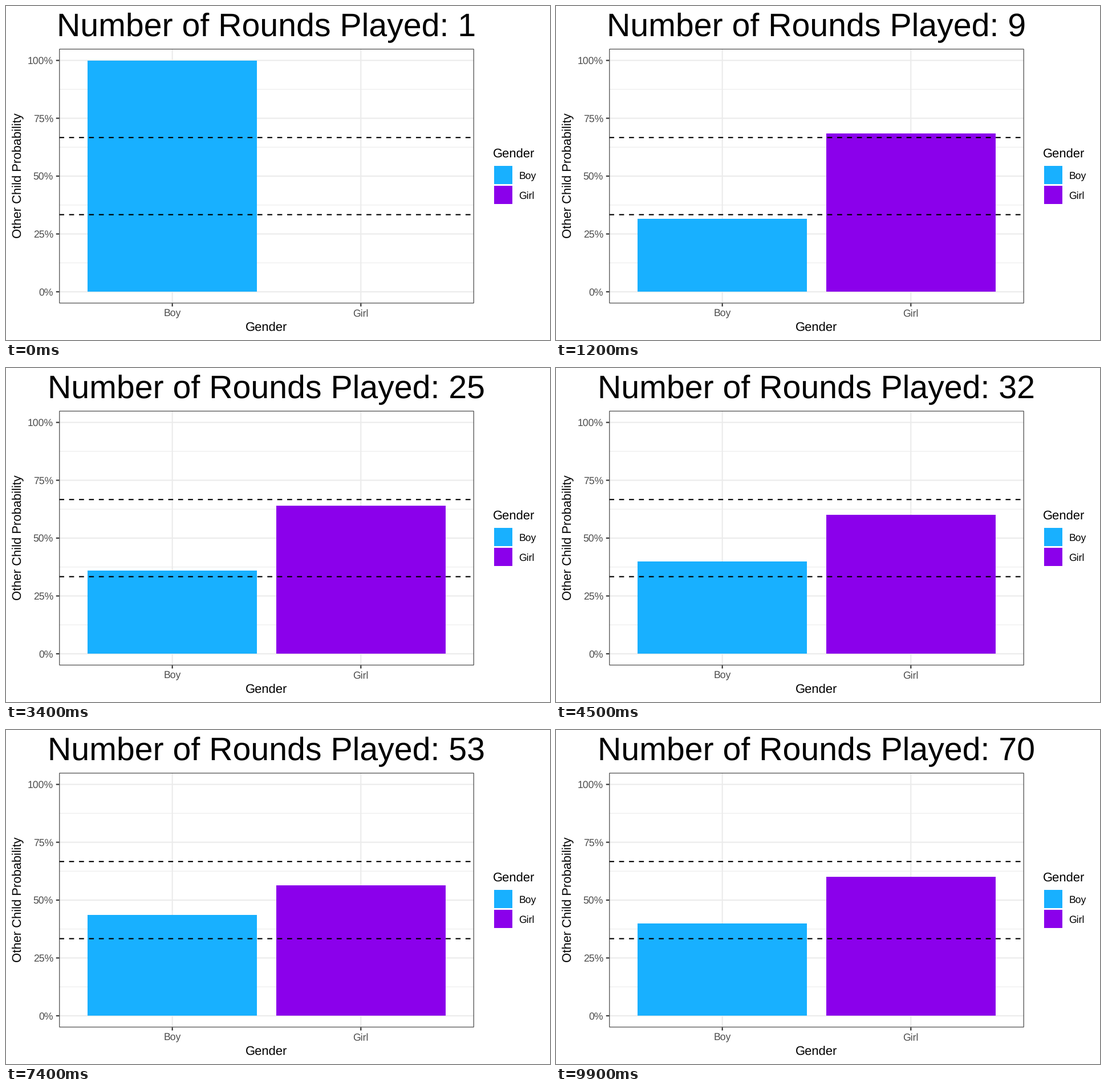
A matplotlib script that plays this animation: 954x587 px, repeating every 10000 ms.

```python
import numpy as np
import matplotlib.pyplot as plt
from matplotlib.animation import FuncAnimation
from matplotlib.patches import Rectangle

plt.rcParams["font.family"] = ["Liberation Sans", "DejaVu Sans"]
plt.rcParams["text.hinting"] = "none"

W, H, DPI = 954, 587, 64
PT = 72 / DPI  # points per pixel
FRAMES, ROUNDS = 100, 70

BLUE, PURPLE = "#18B0FF", "#8B00EB"
GRID, DARK, TICK_TEXT = "#EBEBEB", "#333333", "#4D4D4D"

# Panel edges in pixels, y pointing down
LEFT, RIGHT, TOP, BOTTOM = 93.3, 820.7, 75.3, 522.6
UNIT = (RIGHT - LEFT) / 2.2
SPAN = (BOTTOM - TOP) / 1.1
ZERO = BOTTOM - 0.05 * SPAN
CENTERS = [LEFT + 0.6 * UNIT, LEFT + 1.6 * UNIT]
MID_X, MID_Y = (LEFT + RIGHT) / 2, (TOP + BOTTOM) / 2
THICK, THIN, DASH = 2.13, 1.07, 8.69

# Running count of boys; shares are rounded to whole percents
rounds = np.arange(1, ROUNDS + 1)
boys = np.ceil(np.interp(rounds, [1, 9, 10, 16, 25, 41, 52, 53, 70],
                         [1, 3, 3, 6, 9, 18, 23, 23, 28]) - 0.5)
shares = np.round(boys / rounds, 2)
key_times = np.round((rounds - 1) * (FRAMES - 1) / (ROUNDS - 1))

fig = plt.figure(figsize=(W / DPI, H / DPI), dpi=DPI, facecolor="white")
ax = fig.add_axes([0, 0, 1, 1])
ax.set(xlim=(0, W), ylim=(H, 0))
ax.axis("off")


def y_at(p):
    return ZERO - p * SPAN


def line(x, y, color, width, z=1, **kw):
    ax.plot(x, y, color=color, lw=width * PT, zorder=z, snap=False,
            solid_capstyle="butt", dash_capstyle="butt", **kw)


def label(x, y, s, size, color="black", ha="center", **kw):
    return ax.text(x, y, s, fontsize=size * PT, color=color, ha=ha,
                   va="baseline", **kw)


def box(x, y, w, h, color):
    return ax.add_patch(Rectangle((x, y), w, h, facecolor=color, lw=0,
                                  zorder=2, snap=True))


# Grid, ticks and tick labels
for p in (0.125, 0.375, 0.625, 0.875):
    line([LEFT, RIGHT], [y_at(p)] * 2, GRID, THIN, 0.5)
for p in (0, 0.25, 0.5, 0.75, 1):
    y = y_at(p)
    line([LEFT, RIGHT], [y, y], GRID, THICK)
    line([LEFT - 5.5, LEFT], [y, y], DARK, THICK, 5)
    label(83, y + 6.3, f"{p:.0%}", 17.6, TICK_TEXT, "right")
for x, name in zip(CENTERS, ("Boy", "Girl")):
    line([x, x], [TOP, BOTTOM], GRID, THICK)
    line([x, x], [BOTTOM, BOTTOM + 5.5], DARK, THICK, 5)
    label(x, 545.6, name, 17.6, TICK_TEXT)

# Reference lines and panel border
for p in (1 / 3, 2 / 3):
    line([LEFT, RIGHT], [y_at(p)] * 2, "black", THICK, 3,
         linestyle=(0, (DASH / THICK, DASH / THICK)))
ax.add_patch(Rectangle((LEFT + 0.5, TOP + 0.5), RIGHT - LEFT - 1,
                       BOTTOM - TOP - 1, fill=False, ec=DARK, lw=1.1 * PT,
                       zorder=4, snap=False))

# Titles and legend
label(MID_X, 571.7, "Gender", 22)
label(27.6, MID_Y - 0.8, "Other Child Probability", 22, rotation=90,
      rotation_mode="anchor")
label(854, 267, "Gender", 22, ha="left")
for y, name, color in ((281, "Boy", BLUE), (316, "Girl", PURPLE)):
    box(856, y, 32, 32, color)
    label(899.6, y + 22.8, name, 17.6, ha="left")

title = label(MID_X - 0.7, 53, "", 57.2)
bars = [box(x - 0.45 * UNIT, ZERO, 0.9 * UNIT, 0, c)
        for x, c in zip(CENTERS, (BLUE, PURPLE))]


def update(i):
    played = round(1 + i * (ROUNDS - 1) / (FRAMES - 1))
    title.set_text(f"Number of Rounds Played: {played}")
    boy = np.interp(i, key_times, shares)
    for bar, p in zip(bars, (boy, 1 - boy)):
        bar.set_height(-p * SPAN)
    return [title, *bars]


anim = FuncAnimation(fig, update, frames=FRAMES, interval=100, repeat=True,
                     repeat_delay=0, blit=False)
plt.show()
```
